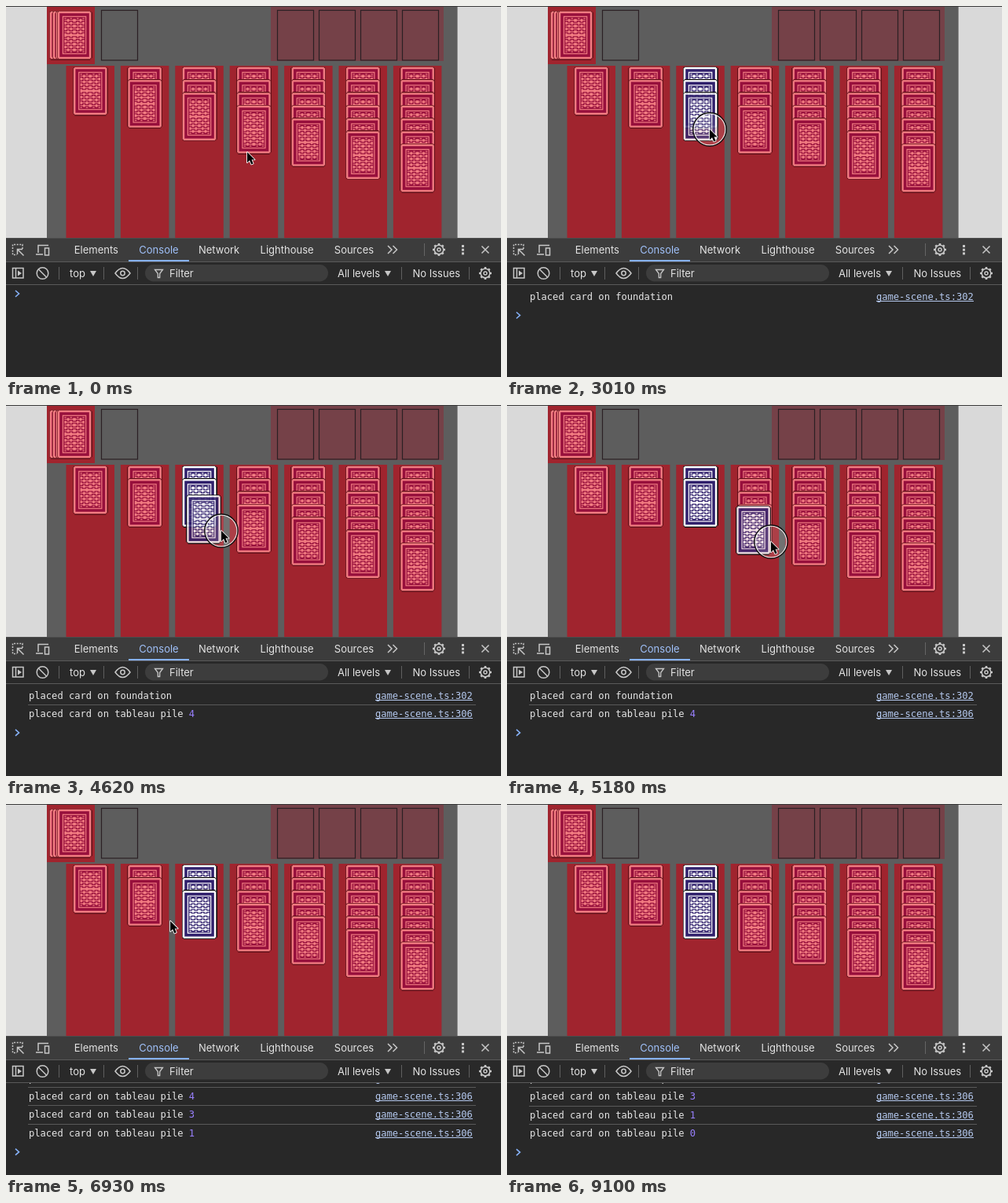
Animation, 630 px wide and 472 px high, one loop 9170 ms. Source, as an HTML page with a canvas:

```html
<!DOCTYPE html>
<html lang="en">
<head>
<meta charset="utf-8">
<title>Solitaire drag and drop</title>
<style>
html, body { margin: 0; width: 100%; height: 100%; overflow: hidden; background: #282828; }
canvas { display: block; }
</style>
</head>
<body>
<canvas id="stage" width="630" height="472"></canvas>
<script>
const g = document.getElementById('stage').getContext('2d');
const LOOP = 9170, STEP = 70;
const UI = '13px Inter, Roboto, sans-serif';
const MONO = '12.1px "DejaVu Sans Mono", "Liberation Mono", monospace';
const CARD_W = 45, CARD_H = 63, GAP = 16.35, HOME = { x: 223.5, y: 109.2 };

// Pointer path: time, x, y
const path = [
  [70, 307, 186], [630, 262, 146], [910, 262, 146], [1300, 455, 60],
  [1610, 327, 89], [1680, 334, 85], [1820, 354, 65], [1960, 455, 51],
  [2100, 455, 51], [2240, 425, 55], [2310, 425, 55], [2700, 231, 142],
  [2870, 258, 157], [3010, 258, 157], [3640, 382, 180], [3920, 382, 180],
  [4410, 268.5, 155.5], [4550, 268.5, 155.5], [4620, 274, 160],
  [5040, 336, 174], [5320, 336, 174], [5880, 238, 151], [6020, 238, 151],
  [6440, 166, 152], [6650, 166, 152], [7200, 250, 146], [7340, 250, 146],
  [7700, 138, 154], [7910, 120, 156], [8120, 120, 156], [8900, 330, 484]
];
// Button down, button up, what the drop logs
const drags = [
  [910, 2100, 'foundation', '', 302],
  [3010, 3780, 'tableau pile ', 4, 306],
  [4480, 5250, 'tableau pile ', 3, 306],
  [5950, 6510, 'tableau pile ', 1, 306],
  [7340, 8050, 'tableau pile ', 0, 306]
];

function pointerAt(t) {
  const i = path.findIndex(p => p[0] > t);
  if (i === 0) return { x: path[0][1], y: path[0][2] };
  if (i < 0) return { x: path.at(-1)[1], y: path.at(-1)[2] };
  const [t0, x0, y0] = path[i - 1], [t1, x1, y1] = path[i];
  let k = (t - t0) / (t1 - t0);
  k *= k * (3 - 2 * k);
  return { x: x0 + (x1 - x0) * k, y: y0 + (y1 - y0) * k };
}

// Card back on a 37 x 52 pixel grid, built from rings and a mirrored weave
function makeCard(dark, light, ink) {
  const c = document.createElement('canvas');
  c.width = 37;
  c.height = 52;
  const q = c.getContext('2d');
  for (let y = 0; y < 52; y++) for (let x = 0; x < 37; x++) {
    const ex = Math.min(x, 36 - x), ey = Math.min(y, 51 - y), ring = Math.min(ex, ey);
    if (ex + ey < 2) continue;
    let color = light;
    if (ring === 0 || ex + ey === 2) color = dark;
    else if (ring > 2 && ring < 6 || ring === 7) color = ink;
    else if (ring > 7) {
      const a = Math.abs(x - 18), b = Math.floor(Math.abs(y - 25.5));
      if (((a + b) % 6 < 2) !== ((a - b + 60) % 6 < 2)) color = ink;
    }
    q.fillStyle = color;
    q.fillRect(x, y, 1, 1);
  }
  return c;
}
const redCard = makeCard('#620f18', '#f27c81', '#970f3c');
const blueCard = makeCard('#08080a', '#ffffff', '#30206c');

const card = (img, x, y) => g.drawImage(img, x, y, CARD_W, CARD_H);

function rect(x, y, w, h, color) {
  g.fillStyle = color;
  g.fillRect(x, y, w, h);
}
function text(s, x, y, color = '#e3e3e3', font = UI) {
  g.font = font;
  g.fillStyle = color;
  g.fillText(s, x, y);
}
function line(d, color = '#c7c7c7', width = 1.5) {
  g.strokeStyle = color;
  g.lineWidth = width;
  g.stroke(new Path2D(d));
}
function ring(x, y, r, color = '#c7c7c7', width = 1.5) {
  g.beginPath();
  g.arc(x, y, r, 0, 7);
  g.strokeStyle = color;
  g.lineWidth = width;
  g.stroke();
}
function slot(x) {
  g.strokeStyle = '#2b2024';
  g.lineWidth = 1.2;
  g.strokeRect(x + .5, 5.5, 46, 63.5);
}
function gear(x, y) {
  ring(x, y, 5.8);
  ring(x, y, 2);
  for (let i = 0; i < 8; i++) {
    const c = Math.cos(i * Math.PI / 4), s = Math.sin(i * Math.PI / 4);
    line(`M${x + 6 * c} ${y + 6 * s}L${x + 8 * c} ${y + 8 * s}`, '#c7c7c7', 2.6);
  }
}
function caret(x, y) {
  g.fillStyle = '#c7c7c7';
  g.fill(new Path2D(`M${x} ${y}h8l-4 7z`));
}

function drawTable(lifted, raised) {
  rect(0, 0, 630, 296, '#d9d9d9');
  rect(52, 0, 522.6, 296, '#5d5d5d');
  rect(52, 1, 61, 73, '#a0242e');
  for (const x of [54.5, 58.5, 62.5, 64.5]) card(redCard, x, 5.5);
  slot(121);
  rect(337, 1, 220, 69, '#754148');
  for (let i = 0; i < 4; i++) slot(345 + 53 * i);
  for (let col = 0; col < 7; col++) {
    const x = 76.5 + 69.4 * col;
    rect(x, 76, 61.5, 220, '#a0242e');
    const count = col + 1 - (col === 2 && lifted ? 1 : 0);
    for (let i = 0; i < count; i++)
      card(col === 2 && raised ? blueCard : redCard, x + 8.2, 76.5 + GAP * i);
  }
  rect(0, 0, 630, 1, '#3a3a3a');
}

function drawToolbars() {
  rect(0, 295, 630, 30, '#3c3c3c');
  rect(0, 295, 630, 1, '#4c4c4c');
  rect(0, 325, 630, 30, '#292929');
  rect(0, 325, 630, 1, '#5a5a5a');
  rect(0, 354, 630, 1, '#5a5a5a');

  // Tabs
  g.setLineDash([2, 1.6]);
  line('M21 309V303.5H8.500V316.500H14');
  g.setLineDash([]);
  line('M14.500 309.500L22.500 317.500M14.500 316V309.500H21');
  line('M41 314V304.500H54M38 316H47M49.500 308H54.500V317H49.500Z');
  const tabs = [['Elements', 86.8], ['Console', 169.3], ['Network', 245], ['Lighthouse', 323.6], ['Sources', 417.8]];
  for (const [name, x] of tabs) text(name, x, 314.5, name === 'Console' ? '#a0c1fa' : '#e3e3e3');
  rect(156, 323, 77, 2, '#86b1f8');
  line('M486 305L491 310L486 315M492.500 305L497.500 310L492.500 315');
  rect(532, 302, 1, 16, '#656565');
  gear(551, 310);
  for (const y of [304, 308.7, 313.4]) rect(580, y, 3, 3, '#c7c7c7');
  line('M605.500 305.500L614.500 314.500M614.500 305.500L605.500 314.500');

  // Console controls
  line('M8.500 333.500H22V346H8.500ZM12.500 333.500V346');
  g.fillStyle = '#c7c7c7';
  g.fill(new Path2D('M15 336.500L20 340L15 343.500Z'));
  ring(46.5, 340, 7.3);
  line('M41.500 335L51.500 345');
  for (const x of [67, 124, 167, 503, 589]) rect(x, 332, 1, 16, '#5f5f5f');
  text('top', 81, 344.5);
  caret(107, 337);
  line('M139 340Q148.500 327 158 340Q148.500 353 139 340Z');
  ring(148.5, 340, 2.7);
  g.fillStyle = '#3d3d3d';
  g.beginPath();
  g.roundRect(177, 329, 233, 21.5, 10.7);
  g.fill();
  line('M189.500 335.500H199.500L195.700 340.500V345.500H193.300V340.500Z', '#c7c7c7', 1.3);
  text('Filter', 208, 344.5);
  text('All levels', 422, 344.5);
  caret(482, 337);
  text('No Issues', 517.5, 344.5);
  gear(610, 340);
}

function drawConsole(logs) {
  rect(0, 355, 630, 117, '#282828');
  g.save();
  g.beginPath();
  g.rect(0, 355, 630, 117);
  g.clip();
  const top = 369.5 - [0, 0, 0, 0, 21, 44][logs.length];
  logs.forEach(([, , place, pile, row], i) => {
    const y = top + 23.4 * i;
    const message = 'placed card on ' + place;
    if (i) rect(28, Math.round(y - 12), 570, 1, '#595959');
    text(message, 29, y + 4, '#e8e8e8', MONO);
    text(pile, 29 + g.measureText(message).width, y + 4, '#9980ff', MONO);
    text('game-scene.ts:' + row, 470, y + 4, '#b4c8ee', MONO);
    rect(470, Math.round(y + 5), 124, 1, '#b4c8ee');
  });
  const y = logs.length ? top + 23.4 * logs.length + .6 : 366;
  line(`M12 ${y - 4}L16.500 ${y}L12 ${y + 4}`, '#86b1f8', 1.6);
  g.restore();
}

function drawPointer({ x, y }, pressed) {
  if (pressed) {
    g.beginPath();
    g.arc(x, y, 21, 0, 7);
    g.fillStyle = 'rgba(255,255,255,.12)';
    g.fill();
    ring(x, y, 20, 'rgba(255,255,255,.85)', 1.4);
    ring(x, y, 21.2, '#111', 1.4);
  }
  g.save();
  g.translate(x, y);
  g.scale(.85, .85);
  const arrow = new Path2D('M0 0V15.500L3.600 12.200L6.200 18.200L9 17L6.500 11.200H11.200Z');
  g.lineJoin = 'round';
  g.strokeStyle = '#fff';
  g.lineWidth = 2;
  g.stroke(arrow);
  g.fillStyle = '#000';
  g.fill(arrow);
  g.restore();
}

function draw(t) {
  const pointer = pointerAt(t);
  const drag = drags.find(([down, up]) => t >= down && t < up);
  drawTable(drag, t >= drags[0][0]);
  if (drag) {
    const grab = pointerAt(drag[0]);
    g.globalAlpha = .86;
    card(blueCard, HOME.x + pointer.x - grab.x, HOME.y + pointer.y - grab.y);
    g.globalAlpha = 1;
  }
  drawToolbars();
  drawConsole(drags.filter(d => t >= d[1]));
  drawPointer(pointer, drag);
}

const start = performance.now();
function tick() {
  const t = (performance.now() - start) % LOOP;
  draw(Math.floor(t / STEP) * STEP);
  requestAnimationFrame(tick);
}
tick();
</script>
</body>
</html>
```
